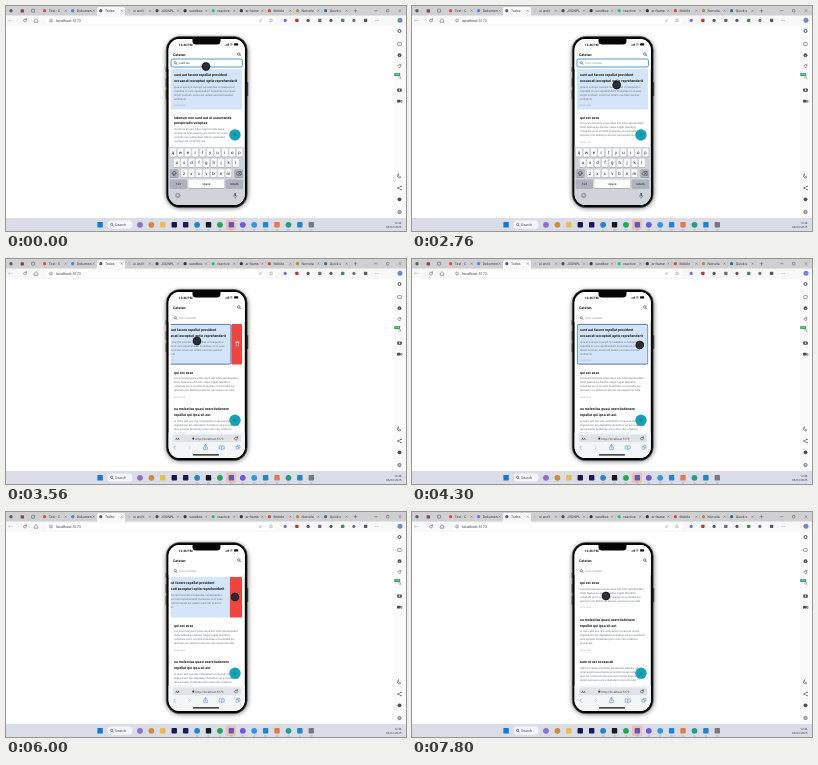
Write an HTML page that moves like this. It is 400x225 px and loops after 8 s.

```html
<!DOCTYPE html>
<html lang="en">
<head>
<meta charset="utf-8">
<title>Notes demo</title>
<style>
html, body { margin: 0; width: 100%; height: 100%; overflow: hidden; background: #fff; }
svg { display: block; width: 100vw; height: 100vh; }
text { font-family: Roboto, "Open Sans", sans-serif; text-rendering: geometricPrecision; white-space: pre; }
</style>
</head>
<body>
<svg id="stage" viewBox="0 0 400 225">
  <defs>
    <clipPath id="screen"><rect x="162.6" y="33" width="76.2" height="166" rx="11"/></clipPath>
    <clipPath id="list"><rect x="164.8" y="62" width="71.5" height="140"/></clipPath>
    <filter id="blur" x="-20%" y="-20%" width="140%" height="140%"><feGaussianBlur stdDeviation="2"/></filter>
  </defs>
</svg>
<script>
const NS = 'http://www.w3.org/2000/svg';
const stage = document.getElementById('stage');
const LOOP = 8000;

function el(parent, tag, attrs, content) {
  const e = document.createElementNS(NS, tag);
  for (const k in attrs) e.setAttribute(k, attrs[k]);
  if (content !== undefined) e.textContent = content;
  parent.appendChild(e);
  return e;
}
const group = (p, attrs = {}) => el(p, 'g', attrs);
const rect = (p, x, y, width, height, fill, rx = 0, more = {}) =>
  el(p, 'rect', { x, y, width, height, fill, rx, ...more });
const dot = (p, cx, cy, r, fill, more = {}) => el(p, 'circle', { cx, cy, r, fill, ...more });
const line = (p, d, stroke, width = 0.6, more = {}) =>
  el(p, 'path', { d, stroke, 'stroke-width': width, fill: 'none', 'stroke-linecap': 'round', 'stroke-linejoin': 'round', ...more });
const text = (p, x, y, size, fill, str, more = {}) =>
  el(p, 'text', { x, y, 'font-size': size, fill, ...more }, str);
const ring = (p, x, y, r, stroke, width = 0.6) => dot(p, x, y, r, 'none', { stroke, 'stroke-width': width });
const middle = { 'text-anchor': 'middle' };
const bold = { 'font-weight': 700 };

function lens(p, x, y, color, r = 1.2) {
  ring(p, x, y, r, color, 0.5);
  line(p, `M${x + r * 0.75} ${y + r * 0.75}l1 1`, color, 0.5);
}
function reload(p, x, y, color) {
  line(p, `M${x + 1.3} ${y - 0.8}A1.5 1.5 0 1 0 ${x + 1.5} ${y + 0.4}M${x + 1.5} ${y - 1.9}v1.2h-1.2`, color, 0.45);
}
const cross = (p, x, y, color, s = 0.9) =>
  line(p, `M${x - s} ${y - s}l${2 * s} ${2 * s}m0 ${-2 * s}l${-2 * s} ${2 * s}`, color, 0.4);

function drawTabs(g, ink) {
  rect(g, 0, 0, 400, 10, '#d0d0d2');
  rect(g, 0, 9.5, 400, 10.5, '#f8f8f9');
  rect(g, 91, 1, 28, 10, '#f8f8f9', 1.5);
  dot(g, 5, 4.7, 1.7, '#5c5f66');
  rect(g, 14.6, 3.2, 3.4, 3.4, '#7d4f4a', 0.7);
  rect(g, 25.6, 3.2, 3, 3, 'none', 0.5, { stroke: ink, 'stroke-width': 0.5 });
  const tabs = [
    ['Test - C', '#d8503c'], ['Dokumen', '#4a86e0'], ['Todos', '#555b66'], ['ui and t', '#c4c4c6'],
    ['JSONPL', '#4a4e55'], ['sandbox', '#33373f'], ['reactive', '#1fc87c'], ['ar-frame', '#33373f'],
    ['Mobile', '#d9473a'], ['Norvela', '#b58a38'], ['Quick s', '#2f6c9c']
  ];
  tabs.forEach(([name, color], i) => {
    const x = 38.6 + i * 28.1;
    dot(g, x, 4.7, 1.6, color);
    text(g, x + 4.1, 6, 3.5, '#3a3c42', name);
    cross(g, x + 21, 4.7, '#55585e', 0.7);
    if (i > 2) line(g, `M${x + 24.2} 3v3.5`, '#a6a6a9', 0.3);
  });
  line(g, 'M348 4.7h3m-1.5-1.5v3M368.5 4.7h2.6', ink, 0.45);
  rect(g, 380.5, 3.5, 2.4, 2.4, 'none', 0.3, { stroke: ink, 'stroke-width': 0.45 });
  cross(g, 394, 4.7, ink, 1.1);
}

function drawToolbar(g, ink) {
  line(g, 'M6.5 14.4h-4m1.5-1.5l-1.5 1.5l1.5 1.5', '#b5b8bd', 0.45);
  reload(g, 19, 14.5, ink);
  line(g, 'M28.4 14.2l1.7-1.5l1.7 1.5v2h-3.4z', ink, 0.5);
  rect(g, 40, 10.9, 230, 7.2, '#fff', 3.5);
  ring(g, 45, 14.5, 1.5, ink, 0.45);
  line(g, 'M45 14.4v.9', ink, 0.45);
  text(g, 50, 15.8, 3.8, '#3b4048', 'localhost:5173');
  ring(g, 254.2, 14.8, 0.9, '#8a8d92', 0.4);
  line(g, 'M255 14.2l1.4-1.2', '#8a8d92', 0.4);
  line(g, 'M265 12.8l.5 1.2h1.3l-1 .8l.4 1.3l-1.2-.8l-1.2.8l.4-1.3l-1-.8h1.3z', '#777b82', 0.35);
  ['#7a62d8', '#b8383a', '#54585f', '#6a6e75', '#55595f', '#3d8c5e', '#6a6f78', '#55595f'].forEach((c, i) =>
    i % 2 ? rect(g, 289.2 + (i - 1) * 11.45, 12.7, 3.4, 3.4, c, 0.8) : dot(g, 279.2 + i * 11.45, 14.4, 1.6, c));
  [369.5, 371, 372.5].forEach(x => dot(g, x, 14.5, 0.35, ink));
  dot(g, 394, 14.2, 2.5, '#6f86d8');
}

function drawSidebar(g, ink) {
  rect(g, 388, 20, 12, 192, '#fafafb');
  ring(g, 393.5, 25, 1.5, ink, 1);
  rect(g, 391.7, 36.6, 3.6, 2.8, 'none', 0.4, { stroke: ink, 'stroke-width': 0.5 });
  dot(g, 393.5, 49.2, 1.9, ink);
  line(g, 'M393.5 49.2v.8', '#fff', 0.5);
  reload(g, 393.5, 60, ink);
  rect(g, 388.2, 67, 6, 3, '#35a663', 0.6);
  text(g, 391.2, 69.4, 2.3, '#fff', 'ON', middle);
  lens(g, 393.6, 71.2, '#777b82', 1);
  rect(g, 391.2, 82.5, 4.6, 3.2, ink, 0.7);
  dot(g, 393.5, 84.1, 0.8, '#f3f5f9');
  rect(g, 391, 93.8, 3.4, 2.8, ink, 0.5);
  line(g, 'M394.6 95.2l1.3-.9v1.8z', ink);
  line(g, 'M392.4 168a2 2 0 1 0 2.5 3a2.3 2.3 0 0 1-2.5-3', ink, 0.6);
  line(g, 'M395 180.4l-3 1.6l3 1.6', ink, 0.5);
  [[395, 180.4], [392, 182], [395, 183.6]].forEach(([x, y]) => dot(g, x, y, 0.7, ink));
  dot(g, 393.5, 193.3, 1.9, ink);
  ring(g, 393.5, 206, 1.6, ink, 0.8);
  dot(g, 393.5, 206, 0.5, ink);
}

function drawTaskbar(g) {
  rect(g, 0, 212, 400, 13, '#dadde8');
  rect(g, 91.4, 216, 5.4, 5.4, '#1579d4', 0.5);
  rect(g, 101.5, 214.5, 25, 8.2, '#f3f5fa', 4);
  lens(g, 105.6, 218.3, '#30343b', 1.1);
  text(g, 109, 219.9, 3.6, '#454a52', 'Search');
  rect(g, 220, 213.6, 10, 10.4, '#eebfb8', 1.2);
  const apps = ['#8f6fc4', '#cf8a3a', '#e8bd4a', '#15164c', '#1b1a57', '#2583cb', '#17191c', '#25a652',
    '#6259b4', '#7059d8', '#3396dd', '#2585cb', '#e27a4c', '#2a9c86', '#2383cc', '#77797f'];
  apps.forEach((c, i) => {
    const x = 134 + i * 11.42;
    if ([0, 1, 5, 7, 9, 10, 13].includes(i)) dot(g, x, 218.8, 2.9, c);
    else rect(g, x - 2.7, 216.1, 5.4, 5.4, c, 0.8);
    if (i > 4) line(g, `M${x - 0.8} 224h1.6`, '#858994', 0.5);
  });
  text(g, 395.5, 217.6, 2.9, '#3f444c', '12:46', { 'text-anchor': 'end' });
  text(g, 395.5, 221.8, 2.9, '#3f444c', '06/02/2025', { 'text-anchor': 'end' });
}

const desktop = group(stage);
rect(desktop, 0, 0, 400, 225, '#fff');
[drawTabs, drawToolbar, drawSidebar, drawTaskbar].forEach(part => part(desktop, '#4a4d53'));

// Phone shell
const phone = group(stage);
rect(phone, 159.5, 31, 83, 172, '#000', 15, { opacity: 0.42, filter: 'url(#blur)' });
[[159.7, 61, 5], [159.7, 72, 9], [159.7, 84, 9], [241, 76, 14]].forEach(([x, y, h]) =>
  rect(phone, x, y, 1.2, h, '#333', 0.5));
rect(phone, 160.3, 30.4, 80.9, 171.2, '#050506', 13.5, { stroke: '#55585d', 'stroke-width': 0.5 });
const screen = group(phone, { 'clip-path': 'url(#screen)' });
rect(screen, 162, 33, 78, 166, '#fff');

// Notes
const notes = {
  first: {
    title: ['sunt aut facere repellat provident', 'occaecati excepturi optio reprehenderit'],
    body: ['quia et suscipit suscipit recusandae consequuntur', 'expedita et cum reprehenderit molestiae ut ut quas',
      'totam nostrum rerum est autem sunt rem eveniet', 'architecto']
  },
  labor: {
    title: ['laborum non sunt aut ut assumenda', 'perspiciatis voluptas'],
    body: ['inventore ab sint natus fugit id nulla sequi', 'architecto nihil quaerat eos tenetur in in eum',
      'veritatis non quibusdam officiis aspernatur', 'cumque aut commodi aut']
  },
  sint: {
    title: ['sint suscipit perspiciatis velit dolorum', 'rerum ipsa laboriosam odio'],
    body: ['suscipit nam nisi quo aperiam aut asperiores eos', 'fugit maiores voluptatibus quia voluptatem quis',
      'ullam qui in alias quia est consequatur magni', 'mollitia accusamus ea nisi voluptate dicta']
  },
  qui: {
    title: ['qui est esse'],
    body: ['est rerum tempore vitae sequi sint nihil reprehenderit', 'dolor beatae ea dolores neque fugiat blanditiis',
      'voluptate porro vel nihil molestiae ut reiciendis qui', 'aperiam non debitis possimus qui neque nisi nulla']
  },
  ea: {
    title: ['ea molestias quasi exercitationem', 'repellat qui ipsa sit aut'],
    body: ['et iusto sed quo iure voluptatem occaecati omnis', 'eligendi aut ad voluptatem doloribus vel accusantium',
      'quis pariatur molestiae porro eius odio et labore', 'et velit aut']
  },
  eum: {
    title: ['eum et est occaecati'],
    body: ['ullam et saepe reiciendis voluptatem adipisci sit', 'amet autem assumenda provident rerum culpa',
      'quis hic commodi nesciunt rem tenetur doloremque', 'ipsam iure quis sunt voluptatem rerum illo velit']
  }
};

const list = group(screen, { 'clip-path': 'url(#list)' });
const red = group(list);
const redBox = rect(red, 225, 65, 12, 40.5, '#f0443e', 1.2);
line(red, 'M229.6 83.4h3.6M230.6 83.4v-.8h1.6v.8M230.1 83.6l.3 3.4h2l.3-3.4', '#fff', 0.5);

function card(key) {
  const note = notes[key], g = group(list), tall = note.title.length * 5.5;
  if (key === 'first') {
    rect(g, 164.8, 65, 71.5, 40.5, '#d4e5f9', 1);
    note.edge = rect(g, 165.2, 65.4, 70.7, 39.7, 'none', 1.6, { stroke: '#3a5f93', 'stroke-width': 0.8 });
  }
  note.title.forEach((s, i) => text(g, 168, 72.2 + i * 5.5, 3.57, '#16191d', s, bold));
  note.body.forEach((s, i) => text(g, 168, 72.6 + tall + i * 4, 2.72, '#6b727b', s));
  text(g, 168, 90.8 + tall, 2.1, '#9aa1aa', '06/02/2025');
  note.step = 31.4 + tall;
  note.node = g;
}
Object.keys(notes).forEach(card);

// Header and search field
const head = group(screen);
rect(head, 162, 33, 78, 30, '#fff');
text(head, 172.6, 39.9, 3.2, '#111', '12:46 PM', bold);
[0, 1, 2].forEach(i => rect(head, 219.5 + i * 1.2, 38.7 - i * 0.6, 0.8, 1 + i * 0.6, '#111'));
line(head, 'M224 38q1.2-1.1 2.4 0M224.6 39q.6-.6 1.2 0', '#111', 0.5);
rect(head, 228, 37.2, 4.2, 2.4, '#111', 0.7);
rect(head, 186.5, 28, 28, 10.6, '#050506', 3.6);
text(head, 167, 49.9, 3.6, '#14171a', 'Catatan', bold);
lens(head, 232.8, 48, '#16191d', 1.3);
const field = group(head);
const fieldBox = rect(field, 165, 53, 71.5, 8, '#fff', 1.8, { stroke: '#2d7fc6', 'stroke-width': 0.8 });
lens(field, 169.3, 56.7, '#30353b', 1.1);
const query = text(field, 173, 58.2, 3.2, '#333', '');

// Floating button
const fab = group(screen);
dot(fab, 229, 129.4, 5.8, '#000', { opacity: 0.14 });
dot(fab, 229, 128.8, 5.6, '#12a3b4');
line(fab, 'M227.6 128.8h2.8m-1.4-1.4v2.8', '#0b6470', 0.5);

// On-screen keyboard
const keys = group(screen);
rect(keys, 162, 141, 78, 58, '#d0d3da');
function keyCap(x, y, w, label, dim, size = 4.4) {
  rect(keys, x, y + 0.5, w, 8.4, '#8d9198', 1.1);
  rect(keys, x, y, w, 8.4, dim ? '#adb2bd' : '#fdfdfe', 1.1);
  text(keys, x + w / 2, y + 4.2 + size * 0.32, size, '#17191c', label, middle);
}
['qwertyuiop', 'asdfghjkl', 'zxcvbnm'].forEach((row, r) => {
  const start = [163.9, 167.6, 174.9][r];
  [...row].forEach((c, i) => keyCap(start + i * 7.4, 142.4 + r * 10.4, 6.2, c));
});
keyCap(163.9, 163.2, 8.4, '', true);
line(keys, 'M168.1 165.2l-2 2.2h1v1.8h2v-1.8h1z', '#17191c', 0.5);
keyCap(228.6, 163.2, 8.4, '', true);
line(keys, 'M230.4 167.4l1.4-1.8h3.4v3.6h-3.4zM232.4 166.6l1.6 1.6m0-1.6l-1.6 1.6', '#17191c', 0.45);
keyCap(163.9, 173.6, 17, '123', true, 3.1);
keyCap(182.2, 173.6, 36.2, 'space', false, 3.1);
keyCap(219.8, 173.6, 17.2, 'return', true, 3.1);
ring(keys, 171.8, 189.5, 2.2, '#555b64', 0.5);
line(keys, 'M170.6 190.1q1.2 1.2 2.4 0M171 188.7v.1M172.6 188.7v.1', '#555b64', 0.5);
rect(keys, 228.4, 186.8, 1.6, 3.4, '#555b64', 0.8);
line(keys, 'M227.4 189.4q0 1.9 1.8 1.9q1.8 0 1.8-1.9M229.2 191.3v1.1', '#555b64', 0.45);

// Mobile browser bar
const bar = group(screen), blue = '#2877d8';
rect(bar, 162, 173.5, 78, 26, '#f4f5f7');
rect(bar, 167, 175.6, 68, 7.6, '#e0e2e6', 1.8);
text(bar, 169.4, 180.6, 3.1, '#22262b', 'AA');
rect(bar, 186.4, 179, 1.8, 1.6, '#33383f', 0.3);
line(bar, 'M186.8 179v-.7q.5-.9 1 0v.7', '#33383f', 0.35);
text(bar, 203.5, 180.6, 3, '#44494f', 'http://localhost:5173', middle);
reload(bar, 230, 179.5, '#22262b');
line(bar, 'M169.4 187l-1.5 1.5l1.5 1.5', blue, 0.5);
line(bar, 'M183 187l1.5 1.5l-1.5 1.5', '#a9b4c4', 0.5);
line(bar, 'M198.5 187.8h-.8v2.8h3.6v-2.8h-.8M199.5 189.2v-3.6m-1 1l1-1l1 1', blue, 0.45);
line(bar, 'M215.7 187.2q-1.2-.8-2.5-.3v3.2q1.3-.5 2.5.3q1.2-.8 2.5-.3v-3.2q-1.3-.5-2.5.3v3.2', blue, 0.45);
rect(bar, 230, 187.5, 2.7, 2.7, 'none', 0.5, { stroke: blue, 'stroke-width': 0.45 });
line(bar, 'M231.1 187.2v-.9h2.8v2.8h-.9', blue, 0.45);
rect(bar, 187, 195.3, 26, 1.3, '#111', 0.65);

// Touch pointer
const touch = group(stage);
dot(touch, 0, 0, 4.2, '#24272b', { opacity: 0.95 });
ring(touch, 0, 0, 3.8, '#111315', 0.7);

const pointer = [
  [0, 200, 60.5], [2130, 200, 60.5], [2200, 200, 62], [2600, 200.5, 63], [2760, 204.7, 79], [2960, 204.7, 79],
  [3250, 203, 81], [3560, 191, 82], [3760, 190, 82], [3850, 190, 82], [4250, 227.8, 86], [4760, 227.8, 86],
  [5060, 214, 85], [5460, 200, 85], [5600, 200, 85], [5960, 229, 85], [6730, 229, 85], [7500, 194, 84], [8000, 194, 84]
];
const swipe = [[0, 0], [3250, 0], [3560, -11], [3850, -12], [4150, 0], [5060, 0], [5460, -12.7], [8000, -12.7]];
const typed = [[0, 'sunt au'], [30, 'sunt a'], [240, 'sunt '], [440, 'sunt'], [640, 'sun'], [860, 'su'], [1500, 's'], [1680, '']];
const KEYS_OFF = 3000, DELETED = 6220;

function mix(table, t) {
  const i = Math.max(1, table.findIndex(k => k[0] > t));
  const a = table[i - 1], b = table[i];
  let p = (t - a[0]) / (b[0] - a[0]);
  p = p * p * (3 - 2 * p);
  return a.slice(1).map((v, n) => v + (b[n + 1] - v) * p);
}
const show = (e, on) => e.setAttribute('display', on ? 'inline' : 'none');
const move = (e, x, y) => e.setAttribute('transform', `translate(${x} ${y})`);

function visibleNotes(t, word) {
  if (t >= DELETED) return ['qui', 'ea', 'eum'];
  if (word.length > 2) return ['first', 'labor'];
  if (word === 'su') return ['first', 'sint'];
  return ['first', 'qui', 'ea'];
}

function draw(t) {
  const typing = t < KEYS_OFF;
  const word = typed.filter(k => k[0] <= t).pop()[1];
  const [dx] = mix(swipe, t);

  const items = visibleNotes(t, word);
  for (const key in notes) show(notes[key].node, items.includes(key));
  let y = typing ? -2 : 0;
  items.forEach(key => {
    move(notes[key].node, key === 'first' ? dx : 0, y);
    y += notes[key].step;
  });
  show(red, dx < -0.05 && t < DELETED);
  redBox.setAttribute('x', 236.3 + dx);
  redBox.setAttribute('width', -dx);
  show(notes.first.edge, t >= KEYS_OFF && t < 5060);

  show(keys, typing);
  show(bar, !typing);
  move(fab, 0, typing ? 0 : 32.4);
  move(field, 0, typing ? 0 : 2);
  fieldBox.setAttribute('stroke', typing ? '#2d7fc6' : 'none');
  query.textContent = word || 'Cari catatan...';
  query.setAttribute('fill', word ? '#333' : '#9299a2');
  move(touch, ...mix(pointer, t));
}

const begin = performance.now();
function tick() {
  draw((performance.now() - begin) % LOOP);
  requestAnimationFrame(tick);
}
tick();
</script>
</body>
</html>
```
